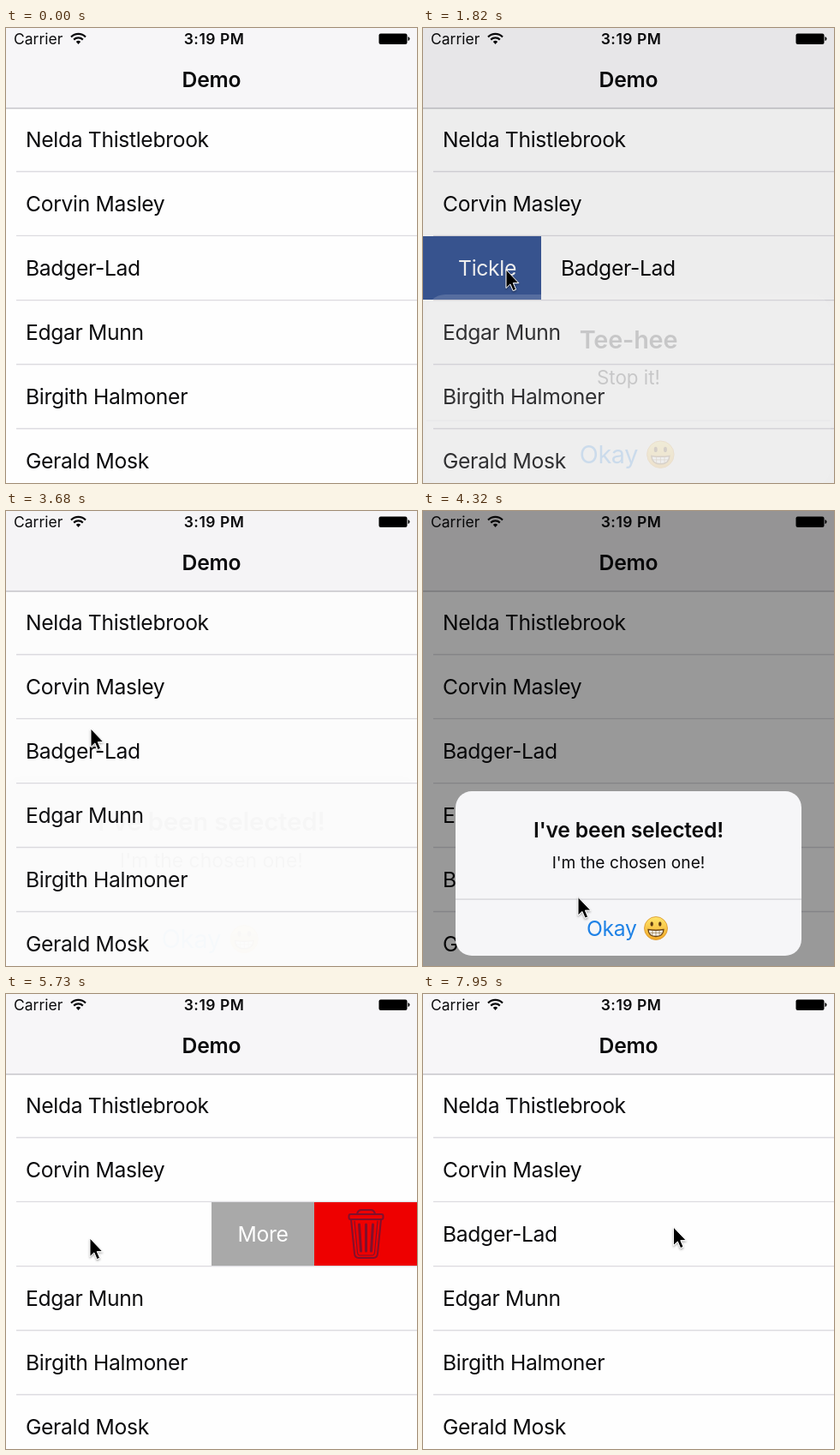
An HTML page for the animation above (8000 ms loop, 480 by 531 pixels).

```html
<!DOCTYPE html>
<html lang="en">
<head>
<meta charset="utf-8">
<title>Swipe list demo</title>
<style>
  html, body { margin: 0; width: 100%; height: 100%; overflow: hidden; background: #fefefe; }
  svg { display: block; width: 480px; height: 531px; }
  text { font-family: Inter, Roboto, sans-serif; font-optical-sizing: none; fill: #0b0b0d; }
  .body { font-size: 24.7px; letter-spacing: -.014em; }
  .title { font-size: 24.7px; font-weight: 600; letter-spacing: -.008em; }
  .small { font-size: 17.5px; }
  .note { font-size: 19.2px; }
  .mid { text-anchor: middle; }
  .white { fill: #fff; }
</style>
</head>
<body>
<svg viewBox="0 0 480 531">
  <defs>
    <linearGradient id="face" x2="0" y2="1">
      <stop offset="0" stop-color="#ffe56b"/>
      <stop offset="1" stop-color="#f2a928"/>
    </linearGradient>
    <filter id="soft" x="-50%" y="-30%" width="220%" height="180%">
      <feDropShadow dx="0" dy="1.5" stdDeviation="1.3" flood-opacity=".35"/>
    </filter>
  </defs>

  <rect width="480" height="531" fill="#fefefe"/>
  <g id="list"></g>

  <!-- Swiped row: buttons stay put, the cell slides over them -->
  <g id="left">
    <rect y="243" width="150" height="74" fill="#3b5998"/>
    <text class="body mid white" x="75" y="289">Tickle</text>
  </g>
  <g id="right">
    <rect x="240" y="243" width="120" height="74" fill="#a9a9a9"/>
    <text class="body mid white" x="300" y="289">More</text>
    <rect x="360" y="243" width="120" height="74" fill="#ee0000"/>
    <g fill="none" stroke="#80102c" stroke-width="2" stroke-linejoin="round" stroke-linecap="round">
      <rect x="400.5" y="257" width="40" height="6" rx="2"/>
      <path d="M410 257q1-5 5-5h11q4 0 5 5M403 263l4 40q.5 5 5 5h17q4.5 0 5-5l4-40"/>
      <path d="M407 265l3.500 37q.5 3 3 3h14q2.500 0 3-3l3.500-37" stroke-width="1.2"/>
      <path d="M412.500 269l2 31M420.500 269v31M428.500 269l-2 31" stroke-width="3"/>
    </g>
  </g>
  <g id="cell">
    <rect y="243" width="480" height="74" fill="#fefefe"/>
    <text class="body" x="23" y="289">Badger-Lad</text>
  </g>

  <rect width="480" height="93" fill="#f7f6f8"/>
  <rect y="92.900" width="480" height="1.500" fill="#c6c5ca"/>
  <text class="small" x="9" y="19">Carrier</text>
  <path d="M76 10.500a12 12 0 0 1 17 0M79.200 13.600a7.600 7.600 0 0 1 10.600 0"
        fill="none" stroke="#0b0b0d" stroke-width="2.200"/>
  <path d="M81.800 16a4 4 0 0 1 5.400 0l-2.700 3z" fill="#0b0b0d"/>
  <text class="small mid" x="243" y="19" font-weight="600" letter-spacing=".5">3:19 PM</text>
  <rect x="435.500" y="6.500" width="33" height="12.500" rx="2"/>
  <path d="M469.500 10q2 .5 2 2.500t-2 2.500z"/>
  <text class="title mid" x="240" y="69">Demo</text>

  <rect id="dim" width="480" height="531"/>
  <g id="alert">
    <rect x="38" y="327" width="404" height="192" rx="19" fill="#f6f6f8"/>
    <rect x="38" y="452.500" width="404" height="1.200" fill="#d2d2d6"/>
    <text id="head" class="title mid" x="240" y="381"></text>
    <text id="note" class="note mid" x="240" y="417"></text>
    <text class="body" x="191" y="496" style="fill:#1f82e6">Okay</text>
    <circle cx="272" cy="487" r="13.500" fill="url(#face)" stroke="#d9942a" stroke-width=".8"/>
    <ellipse cx="267.200" cy="482" rx="1.700" ry="2.700" fill="#5c3a12"/>
    <ellipse cx="276.800" cy="482" rx="1.700" ry="2.700" fill="#5c3a12"/>
    <path d="M263 488.500q9 1.500 18 0q-.5 8-9 8t-9-8z" fill="#fff" stroke="#6a4314" stroke-width="1.300"/>
    <path d="M264 492.300h16M268 489.500v6M272 489.500v6.500M276 489.500v6" stroke="#8a6a3c" stroke-width=".7"/>
  </g>

  <path id="pointer" d="M0 0V21.500L4.900 16.900L8.200 24.600L11.600 23.200L8.300 15.600H14.800Z"
        stroke="#fff" filter="url(#soft)"/>
</svg>

<script>
const LOOP = 8000, FADE = 404, CLOSE = 575;
const $ = id => document.getElementById(id);
const place = (id, transform) => $(id).setAttribute('transform', transform);

const rows = ['Nelda Thistlebrook', 'Corvin Masley', '', 'Edgar Munn', 'Birgith Halmoner', 'Gerald Mosk'];
$('list').innerHTML = rows.map((name, i) =>
  `<text class="body" x="23" y="${139 + 75 * i}">${name}</text>` +
  `<rect x="12" y="${166.8 + 75 * i}" width="468" height="1.5" fill="#dcdbe0"/>`).join('');

const alerts = [
  { show: 1706, hide: 2608, head: 'Tee-hee', note: 'Stop it!' },
  { show: 3640, hide: 4640, head: "I've been selected!", note: "I'm the chosen one!" },
  { show: 6474, hide: 7280, head: 'You want MORE?!', note: 'no' }
];

// A drag opens the row as far as its buttons reach; showing the alert closes it
const swipes = [
  { start: 870, from: 140, width: 150, dir: 1, alert: alerts[0] },
  { start: 5500, from: 338, width: 240, dir: -1, alert: alerts[2] }
];

// Pointer moves: start and end time, then where it comes to rest
const entry = { x: 215, y: 545 };
const moves = [
  [50, 820, 140, 282],
  [870, 1150, 380, 282],
  [1250, 1600, 97, 282],
  [1860, 2350, 171, 470],
  [2560, 3060, 99, 254],
  [3880, 4400, 185, 460],
  [4640, 5360, 338, 285],
  [5500, 5730, 98, 285],
  [5860, 6230, 296, 280],
  [6700, 7080, 215, 476],
  [7300, 7900, 292.5, 272]
];

const ease = (t, start, span) => {
  const p = Math.min(1, Math.max(0, (t - start) / span));
  return p < .5 ? 2 * p * p : 1 - 2 * (1 - p) ** 2;
};

const pointerAt = t => moves.reduce((at, [start, end, x, y]) => {
  const p = ease(t, start, end - start);
  return { x: at.x + (x - at.x) * p, y: at.y + (y - at.y) * p };
}, entry);

function cellOffset(t) {
  const s = swipes.find(s => t >= s.start && t < s.alert.show + CLOSE);
  if (!s) return 0;
  // The row stays open once the drag has reached its far end
  const [, end, far] = moves.find(m => m[0] === s.start);
  const x = t < end ? pointerAt(t).x : far;
  const open = Math.min(s.width, Math.abs(x - s.from));
  return s.dir * open * (1 - ease(t, s.alert.show, CLOSE));
}

function draw(t) {
  const { x, y } = pointerAt(t);
  place('pointer', `translate(${x} ${y})`);

  const dx = cellOffset(t);
  place('cell', `translate(${dx} 0)`);
  $('left').style.display = dx > 0 ? '' : 'none';
  $('right').style.display = dx < 0 ? '' : 'none';

  const a = alerts.find(a => t >= a.show && t < a.hide + FADE);
  const shown = a ? ease(t, a.show, FADE) : 0;
  const level = a ? shown - ease(t, a.hide, FADE) : 0;
  $('dim').setAttribute('opacity', .4 * level);
  $('alert').setAttribute('opacity', level);
  place('alert', `translate(240 423) scale(${1.2 - .2 * shown}) translate(-240 -423)`);
  $('head').textContent = a ? a.head : '';
  $('note').textContent = a ? a.note : '';
}

const start = performance.now();
function tick() {
  draw((performance.now() - start) % LOOP);
  requestAnimationFrame(tick);
}
tick();
</script>
</body>
</html>
```
